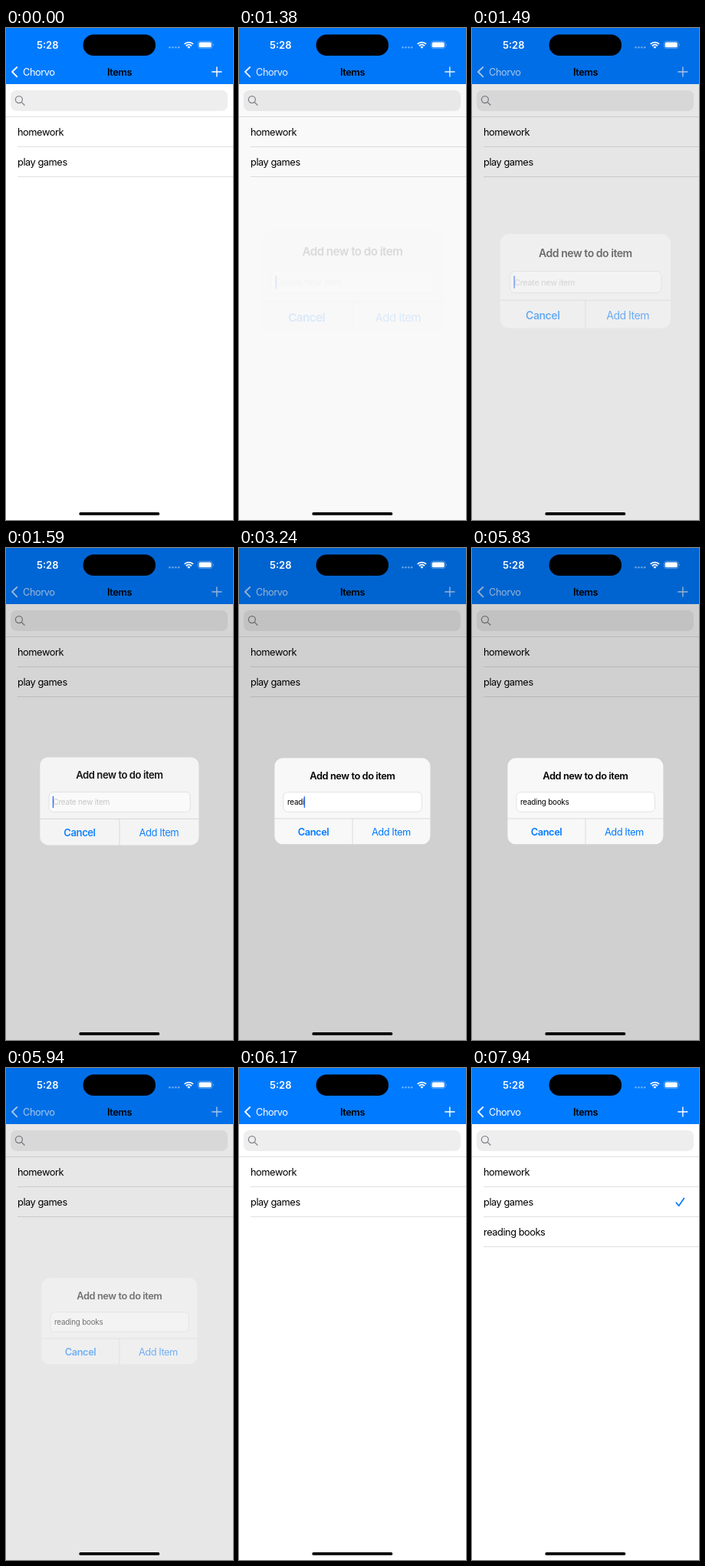
An HTML page for the animation above (8000 ms loop, 296 by 640 pixels).

```html
<!DOCTYPE html>
<html lang="en">
<head>
<meta charset="utf-8">
<title>To do list</title>
<style>
html, body { margin: 0; width: 100%; height: 100%; overflow: hidden; background: #fff; }
svg { display: block; width: 296px; height: 640px; }
text { font: 12.8px Inter, "Liberation Sans", sans-serif; letter-spacing: -.45px; white-space: pre; }
.bold { font-weight: 600; letter-spacing: -.42px; }
.mid { text-anchor: middle; }
.small { font-size: 9.8px; letter-spacing: -.2px; }
.line { fill: none; stroke-linecap: round; stroke-linejoin: round; }
.rule { fill: #e0e0e2; }
</style>
</head>
<body>
<svg viewBox="0 0 296 640">
  <rect width="296" height="640" fill="#fff"/>
  <rect width="296" height="73" fill="#007aff"/>
  <g id="back">
    <path class="line" d="M14.3 51L8 57L14.3 63.3" stroke="#fff" stroke-width="1.8"/>
    <text x="22" y="61.5" fill="#fff">Chorvo</text>
  </g>
  <text class="bold mid" x="148" y="61.5">Items</text>
  <path id="plus" class="line" d="M268.8 57H281M274.9 50.9V63.1" stroke="#fff" stroke-width="1.4"/>

  <rect x="6" y="81" width="283" height="27" rx="7.5" fill="#eeeeef"/>
  <g class="line" stroke="#85858a" stroke-width="1.3">
    <circle cx="16.9" cy="93.1" r="4.5"/>
    <path d="M20.2 96.4L24 100.2"/>
  </g>
  <rect class="rule" y="115" width="296" height="1"/>

  <rect id="pressedRow" y="154" width="296" height="40" fill="#d1d1d6"/>
  <text x="15" y="139.5">homework</text>
  <rect class="rule" x="15" y="154" width="281" height="1"/>
  <text x="15" y="178.5">play games</text>
  <rect class="rule" x="15" y="193" width="281" height="1"/>
  <path id="check" class="line" d="M266.3 175.2L269.7 179.3L276.5 169.5" stroke="#007aff" stroke-width="1.7"/>
  <g id="newRow">
    <text x="15" y="217.5">reading books</text>
    <rect class="rule" x="15" y="232" width="281" height="1"/>
  </g>

  <rect id="dim" width="296" height="640"/>

  <g id="alert">
    <rect x="46.4" y="273.3" width="203" height="112" rx="10.5" fill="#f8f8f8"/>
    <path id="pressedButton" d="M148 352H249.4V374.8A10.5 10.5 0 0 1 238.9 385.3H148Z" fill="#e4e4e4"/>
    <text class="bold mid" x="147.9" y="300.6">Add new to do item</text>
    <rect x="57.9" y="317.6" width="180.5" height="25.5" rx="5.5" fill="#fff" stroke="#dcdcde" stroke-width=".8"/>
    <text id="hint" class="small" x="63" y="334.3" fill="#c4c4c7">Create new item</text>
    <text id="typed" class="small" x="63" y="334.3"></text>
    <rect id="caret" y="323" width="1.5" height="15" rx=".7" fill="#2f6ff0"/>
    <path d="M46.4 352H249.4M148 352V385.3" stroke="#d2d2d4" stroke-width=".8"/>
    <text class="bold mid" x="97" y="374.3" fill="#007aff">Cancel</text>
    <text class="mid" x="198.4" y="374.3" fill="#007aff">Add Item</text>
  </g>

  <rect x="100.5" y="8.5" width="94.5" height="27.5" rx="13.75"/>
  <text class="bold" x="40" y="26.6" fill="#fff" style="font-size:13px;letter-spacing:0">5:28</text>
  <g fill="#fff" fill-opacity=".4">
    <circle cx="213.5" cy="25.3" r="1.3"/><circle cx="217.4" cy="25.3" r="1.3"/>
    <circle cx="221.3" cy="25.3" r="1.3"/><circle cx="225.2" cy="25.3" r="1.3"/>
  </g>
  <g class="line" stroke="#fff" stroke-width="1.9" style="stroke-linecap:butt">
    <path d="M232.7 20.9A8.2 8.2 0 0 1 244.1 20.9M234.9 23.2A5 5 0 0 1 241.9 23.2"/>
    <path d="M236.4 24.7A2.9 2.9 0 0 1 240.4 24.7L238.4 26.8Z" fill="#fff" stroke="none"/>
  </g>
  <rect x="250.4" y="17.2" width="18.6" height="9.4" rx="3" fill="none" stroke="#fff" stroke-opacity=".4" stroke-width=".8"/>
  <rect x="251.7" y="18.5" width="16" height="6.8" rx="1.9" fill="#fff"/>
  <path d="M270 20.3Q271.6 21.9 270 23.5Z" fill="#fff" fill-opacity=".5"/>
  <rect x="95.3" y="630" width="105" height="3.8" rx="1.9"/>
</svg>
<script>
const $ = id => document.getElementById(id);
const LOOP = 8000;
const ITEM = "reading books";

// Stepped timelines: [start ms, value]
const presence = [[0, 0], [1380, .12], [1490, .53], [1590, .9], [1690, .98], [1800, 1],
  [5940, .5], [6060, .1], [6170, 0]];
const letters = [[0, 0], [2460, 2], [2740, 4], [3240, 5], [3360, 6], [3510, 7], [3750, 8],
  [3850, 9], [4010, 11], [4210, 12], [4320, 13]];
const caretAlpha = [[0, 1], [2040, .5], [2160, 0], [2310, 1], [4840, .5], [4950, 0],
  [5190, .5], [5300, 1], [5660, .5], [5830, 0]];

const at = (steps, t) => steps.findLast(s => s[0] <= t)[1];
const within = (t, a, b) => t >= a && t < b;
const fade = (id, value) => $(id).setAttribute("opacity", +value);

function draw(t) {
  const p = at(presence, t);
  const tint = 1 - .28 * Math.min(1, p * 2);
  const scale = t < 5000 ? 1 + .2 * (1 - p) : 1;

  fade("dim", .185 * p);
  fade("back", tint);
  fade("plus", within(t, 1060, 1380) ? .4 : tint);

  fade("alert", p);
  $("alert").setAttribute("transform",
    `translate(147.9 329.3) scale(${scale}) translate(-147.9 -329.3)`);
  const text = ITEM.slice(0, at(letters, t));
  $("typed").textContent = text;
  fade("hint", !text);
  $("caret").setAttribute("x", 62.4 + (text ? $("typed").getComputedTextLength() : 0));
  fade("caret", at(caretAlpha, t));
  fade("pressedButton", within(t, 5660, 5830));

  fade("newRow", t >= 7690);
  fade("pressedRow", within(t, 7690, 7940));
  fade("check", t >= 7940);
}

const start = performance.now();
function tick() {
  draw((performance.now() - start) % LOOP);
  requestAnimationFrame(tick);
}
tick();
</script>
</body>
</html>
```
